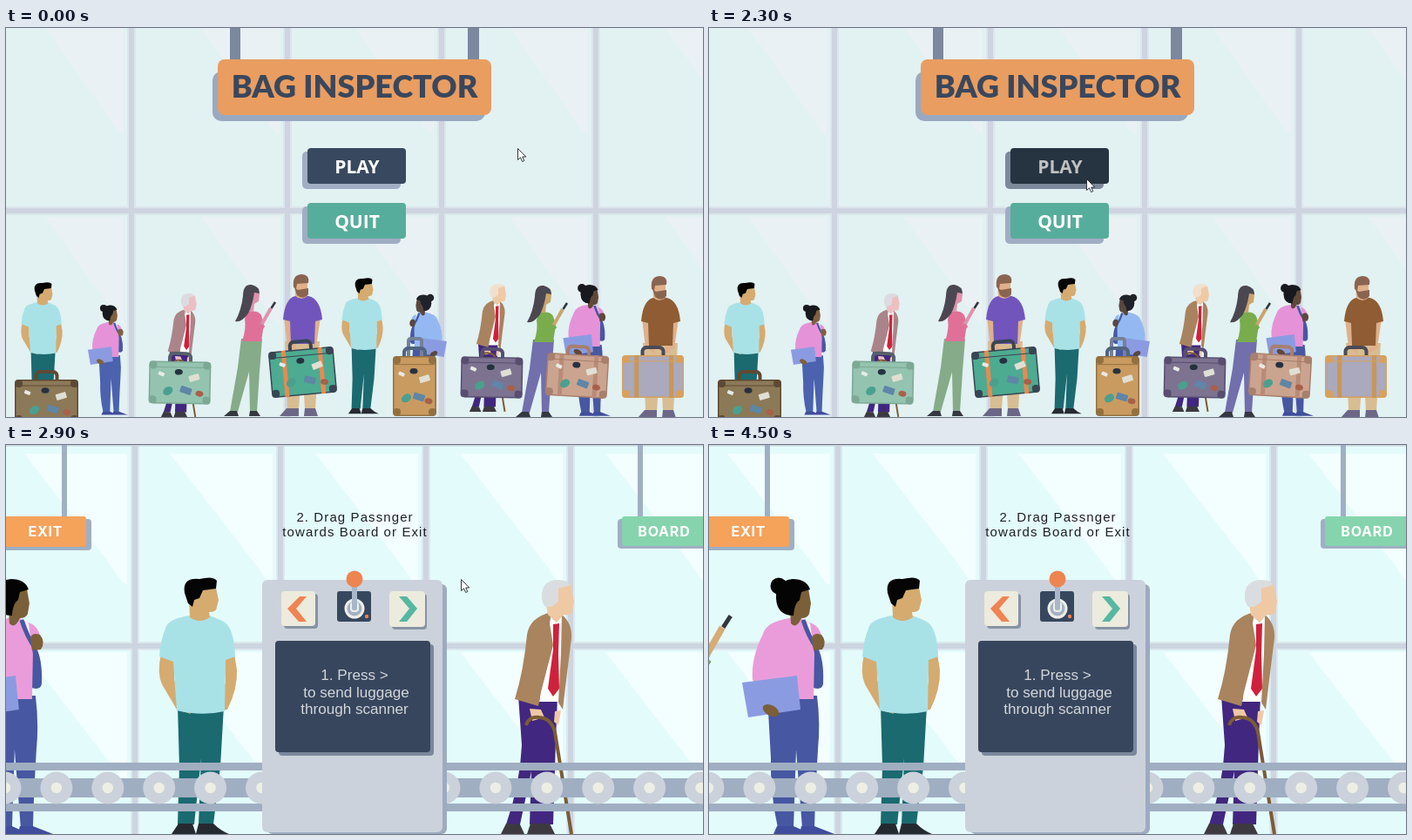
Recreate the animation shown at these times as an HTML page with a canvas. Size 800 by 447 pixels, loop 5000 ms.

```html
<!DOCTYPE html>
<html lang="en">
<head>
<meta charset="utf-8">
<title>Bag Inspector</title>
<style>
html, body { margin: 0; width: 100%; height: 100%; overflow: hidden; }
canvas { display: block; width: 800px; height: 447px; }
</style>
</head>
<body>
<canvas id="stage" width="800" height="447"></canvas>
<script>
const ctx = document.getElementById('stage').getContext('2d');
const LOOP = 5000, STEP = 100;

function fill(color, d) {
  ctx.fillStyle = color;
  ctx.fill(new Path2D(d));
}
function line(color, width, d) {
  ctx.strokeStyle = color;
  ctx.lineWidth = width;
  ctx.stroke(new Path2D(d));
}
function box(color, x, y, w, h, r = 0) {
  ctx.fillStyle = color;
  ctx.beginPath();
  ctx.roundRect(x, y, w, h, r);
  ctx.fill();
}
function oval(color, x, y, rx, ry = rx, angle = 0) {
  ctx.fillStyle = color;
  ctx.beginPath();
  ctx.ellipse(x, y, rx, ry, angle, 0, 7);
  ctx.fill();
}
function text(str, x, y, font, color, spacing = 0) {
  ctx.font = font;
  ctx.letterSpacing = spacing + 'px';
  ctx.fillStyle = color;
  ctx.textAlign = 'center';
  ctx.fillText(str, x + spacing / 2, y);
}
// Draws a figure so that its anchor (ax, ay) lands on (x, y).
function place(ax, ay, x, y, s, draw, flip) {
  ctx.save();
  ctx.translate(x, y);
  ctx.scale(flip ? -s : s, s);
  ctx.translate(-ax, -ay);
  draw();
  ctx.restore();
}

function youngMan(pants = '#1a6a70') {
  const skin = '#d5ab70';
  fill(pants, 'M197 300H250L246 370 238 436H221L224 360 216 436H197L199 370Z');
  fill('#252a31', 'M198 435H214L218 447H190Z M221 435H238Q246 443 256 447H218Z');
  fill(skin, 'M178 240Q173 262 179 275L196 304 212 309 205 292 193 270 193 240Z M250 240L252 272 244 306 254 304Q266 280 265 258L262 240Z');
  fill('#a8e2e7', 'M210 196Q188 200 184 208 177 225 176 243L192 249 196 305Q224 312 251 306L252 247 263 243Q262 208 248 202L234 196Q224 203 210 196Z');
  fill(skin, 'M210 175L211 198Q222 206 234 198L233 192Q242 192 242 186L244 178 241 164 216 162Z');
  fill('#050505', 'M205 170Q202 152 222 154 238 150 242 156L241 165 226 167 222 176 216 178 214 186 209 182Z');
}

function woman(top = '#ea9cda', skin = '#7a5f38', hair = '#040404', pants = '#4757a2') {
  fill(pants, 'M67 288H124Q128 320 125 350 122 400 121 440H107L100 350 97 440H79Q70 400 71 360Z');
  fill('#3f4d9c', 'M78 438H97L117 447H74Z M106 438H121L144 447H104Z');
  fill('#4757a2', 'M116 222Q133 235 131 275 129 283 117 278Z');
  fill(top, 'M92 199Q66 203 62 217 48 245 50 270L62 285 70 272V292H120L121 240 116 205Q108 200 104 198Z M112 203Q127 206 129 220L121 228Z');
  line('#4757a2', 5, 'M108 201Q114 220 124 234');
  fill(skin, 'M118 222Q120 215 129 218 136 226 130 235L120 236Z M92 172L94 205Q100 212 106 199 113 199 115 194L117 182 114 165 98 164Z');
  fill(hair, 'M77 176Q76 156 96 154 112 154 116 166L106 169 104 178Q98 182 97 196 78 196 77 176Z');
  oval(hair, 80, 162, 9.5);
  fill('#8b9be1', 'M38 273L101 265 105 304 45 313Z');
  oval(skin, 71, 305, 10, 6, 0.5);
}

function oldMan(jacket = '#a9845e', skin = '#efc8a4', hair = '#dadddf') {
  fill('#41277f', 'M588 288H633L631 340 628 436H601L603 375 590 436H574Q590 390 592 345Z');
  fill('#3c3a40', 'M574 435L590 436 595 447H568Z M602 435H624L630 447H598Z');
  fill('#ffffff', 'M624 202L640 197 642 230 636 295H612Z');
  fill('#d0213c', 'M628 206L635 205 634 240 635 280 628 289 622 280 628 235Z');
  fill(jacket, 'M626 192Q601 198 598 218 594 260 584 292L611 300 614 284 628 230 624 205Z M638 195Q650 205 649 222L643 270 639 304 634 296 637 240Z');
  fill(skin, 'M618 170L622 195 632 204 640 195Q650 197 650 190L652 180 648 160 630 158Z M601 303L614 304 618 313 604 317Z M630 306L637 305 634 322 629 318Z');
  fill(hair, 'M615 172Q616 155 634 155 646 155 647 161L634 165 634 180 626 186 619 186Q614 180 615 172Z');
  line('#7b5c36', 4, 'M597 322Q600 311 612 313 626 314 630 330L649 447');
}

function phoneGirl(top, skin, pants) {
  fill(pants, 'M270 357H294L291 395 288 441H280L279 395 266 441H257L266 390Z');
  fill('#343840', 'M257 440H265L267 446H250Z M280 440H288L292 446H279Z');
  fill(top, 'M276 327Q288 323 293 330L296 340 293 360H271Q276 345 274 335Z');
  line(skin, 4, 'M291 345L304 322');
  line(top, 6, 'M281 333L291 346 295 341');
  line('#33363d', 2.6, 'M304.5 322L309 315');
  fill(skin, 'M279 298Q291 297 291 306L290 314 285 317 284 326 276 326Z');
  fill('#4b4750', 'M272 308Q272 294 282 295 291 297 291 305L285 304Q283 318 278 328 270 339 263 337 270 325 272 308Z');
}

function beardedMan(shirt) {
  const skin = '#dfb08a', hair = '#8b6450';
  fill('#d8bd93', 'M320 360H360L355 438H343L340 385 336 438H323Z');
  fill('#6c6787', 'M322 437H336V446H314Z M343 437H355L358 446H342Z');
  fill(skin, 'M319 332L323 365 334 373 332 360 329 332Z M351 332L349 360 345 373 356 366 361 332Z');
  fill(shirt, 'M332 308Q320 311 318 335L326 337 327 363H354L355 337 363 335Q361 311 347 308Z');
  fill(skin, 'M331 290H346V308Q339 314 332 308Z');
  fill(hair, 'M330 298Q328 283 340 283 349 284 347 293L334 294 333 300Z M331 298L335 301 347 299V306Q341 313 334 307Z');
}

// Sticker: u, v, width, colour, angle, round
const STICKERS = [
  [0.2, 0.3, 7, '#e8ebe6', 0.4], [0.48, 0.25, 9, '#273140', 0, 1], [0.73, 0.38, 12, '#e0dfd4', -0.3],
  [0.31, 0.7, 12, '#4aa08f', -0.6, 1], [0.6, 0.68, 13, '#5e86a6', 0.3], [0.82, 0.75, 9, '#a8604a', 0.2, 1]
];
function suitcase(x, y, w, h, color, trim, { angle = 0, strap, plain, handle = trim } = {}) {
  ctx.save();
  ctx.translate(x + w / 2, y + h / 2);
  ctx.rotate(angle);
  ctx.translate(-w / 2, -h / 2);
  line(handle, 4, `M${w / 2 - 12} 1V-5Q${w / 2 - 11} -9 ${w / 2 - 7} -9H${w / 2 + 7}Q${w / 2 + 11} -9 ${w / 2 + 12} -5V1`);
  box(trim, 0, 0, w, h, 6);
  box(color, 1.5, 1.5, w - 3, h - 3, 5);
  for (const cx of [0, w - 9]) for (const cy of [0, h - 9]) box(trim, cx, cy, 9, 9, 4);
  if (strap) for (const u of [0.2, 0.76]) box(strap, w * u, 0, 5, h);
  line(trim, 1, `M2 ${h * 0.14}H${w - 2}`);
  if (!plain) for (const [u, v, size, tint, turn, round] of STICKERS) {
    ctx.save();
    ctx.translate(w * u, h * v);
    ctx.rotate(turn);
    if (round) oval(tint, 0, 0, size / 2, size / 2.7);
    else box(tint, -size / 2, -size / 3.4, size, size / 1.7, 1);
    ctx.restore();
  }
  ctx.restore();
}

function glass(base, shine, frame, edge, bars, mid, slope) {
  box(base, 0, 0, 800, 447);
  const width = bars[1] - bars[0];
  for (const right of [...bars, bars[3] + width]) {
    for (const top of [0, mid]) {
      const r = right - 9, y = top ? top + 7 : slope.top;
      fill(shine, `M${r - slope.w} ${y}H${r}V${y + slope.h}Q${r - 6} ${y + slope.h} ${r - 16} ${y + slope.h - 18}Z`);
    }
  }
  for (const [color, half] of [[edge, 5], [frame, 3]]) {
    for (const b of bars) box(color, b - half, 0, half * 2, 447);
    box(color, 0, mid - half, 800, half * 2);
  }
}

function button(label, y, face, shade, ink) {
  box(shade, 340, y + 4, 113, 43, 5);
  box(face, 346, y, 113, 41, 4);
  text(label, 403, y + 29, '700 21px "Open Sans", sans-serif', ink);
}

function crowd() {
  place(177, 152, 18, 292, 0.53, youngMan);
  place(80, 162, 112, 322, 0.43, () => woman('#e692d8', '#80603f', '#18191e', '#4b62ae'));
  place(634, 155, 210, 305, 0.486, () => oldMan('#aa8488', '#edbfc3', '#dbdcdf'));
  phoneGirl('#e07098', '#df93ac', '#85ab88');
  beardedMan('#7155bd');
  place(177, 152, 386, 287, 0.53, youngMan);
  place(80, 162, 487, 310, 0.45, () => woman('#94b9f2', '#59483f', '#20222a'), true);
  place(634, 155, 565, 294, 0.503, () => oldMan('#a9835f', '#f0c9a6', '#f0e0cd'));
  place(307, 318, 642, 319, 1, () => phoneGirl('#79ac4d', '#c9a56c', '#716fac'));
  place(80, 162, 661, 299, 0.515, () => woman('#e692d8', '#604838', '#18191e'));
  place(339, 283, 750, 285, 1, () => beardedMan('#8f5c33'));

  suitcase(10, 404, 73, 50, '#8c7957', '#5e4a34');
  suitcase(164, 383, 71, 49, '#94c3b0', '#7da894', { handle: '#56606a', angle: 0.02 });
  suitcase(303, 369, 75, 53, '#4cab90', '#394553', { angle: -0.09, strap: '#e98950' });
  line('#74819a', 4, 'M462 380V360Q462 357 465 357H474Q477 357 477 360V380');
  suitcase(444, 377, 50, 69, '#c99b60', '#94703f', { handle: '#52657f' });
  suitcase(522, 378, 71, 47, '#7d7391', '#574e70', { angle: 0.02 });
  suitcase(620, 375, 71, 49, '#cba48f', '#a87f6d', { angle: 0.06, strap: '#b98b77' });
  suitcase(707, 376, 71, 49, '#aaa9bd', '#d8a15c', { plain: true, strap: '#c99758', handle: '#4b4a55' });
}

function menu(t) {
  glass('#e2f1f2', '#eaf1f5', '#ced4e0', '#dce5ec', [144, 323, 500, 677], 210, { top: 0, w: 90, h: 122 });
  crowd();
  box('#7b889d', 257, 0, 12, 50);
  box('#7b889d', 530, 0, 13, 50);
  box('#9aa9c2', 237, 50, 313, 57, 10);
  box('#e99d60', 243, 36, 314, 64, 8);
  text('BAG INSPECTOR', 400, 80, '900 36px Lato, sans-serif', '#3a475d');
  if (t < 1700) button('PLAY', 138, '#38485f', '#a0adc3', '#ffffff');
  else button('PLAY', 138, '#263341', '#7c899b', '#bfc1c3');
  button('QUIT', 201, '#57ad9b', '#a0adc3', '#ffffff');
}

// Smooth walk: remaining distance to the resting place.
function walk(t, start, dist, time = 635) {
  const u = Math.min(1, Math.max(0, (t - start) / time));
  return -dist * (1 - u * u * (3 - 2 * u));
}

function belt() {
  const rail = '#a0aec1';
  for (const [y, h] of [[365, 9], [383, 22], [412, 9]]) box(rail, 0, y, 800, h);
  for (const x0 of [-1, 503]) for (let i = 0; i < 6; i++) {
    const x = x0 + i * 58.9;
    oval('#cbd2db', x, 394, 18.5);
    oval('#eeefe4', x, 394, 6.2);
  }
}

function machine() {
  box('#9dabc0', 300, 160, 206, 287, 6);
  box('#cbd2db', 294, 155, 207, 290, 6);
  const chevron = '#f08351', arrow = '#55b8a3';
  box('#8793a4', 319, 171, 39, 40, 4);
  box('#ecebdd', 316, 168, 39, 40, 4);
  box('#8793a4', 443, 171, 40, 41, 4);
  box('#ecebdd', 440, 168, 41, 41, 4);
  fill(chevron, 'M337 174H345L333 188 345 203H336L323 188Z');
  fill(arrow, 'M451 174H460L472 188 460 203H451L463 188Z');
  box('#37475e', 380, 168, 39, 35, 3);
  oval('#eeefe8', 400, 188, 11.5);
  oval('#a5b1c3', 400, 188, 8.5);
  box('#eeefe8', 395, 180, 10, 12, 4);
  box('#a9b7cb', 397, 160, 6, 30, 2);
  oval('#ee8450', 400, 154, 9.5);
  oval('#ee8450', 414, 197, 2.2);
  box('#7a879c', 313, 229, 178, 128, 4);
  box('#37465d', 309, 225, 178, 128, 4);
  const font = '17.1px "Liberation Sans", Arial, sans-serif', ink = '#d3d6db';
  text('1. Press >', 400, 270, font, ink);
  text('to send luggage', 402, 290, font, ink);
  text('through scanner', 400, 309, font, ink);
}

function signs() {
  const font = '700 16px Inter, sans-serif';
  box('#a1afc3', 64, 0, 6, 90);
  box('#9fafc3', -10, 85, 108, 36, 4);
  box('#f5a25b', -10, 82, 102, 35, 3);
  text('EXIT', 45, 105, font, '#ffffff', 0.8);
  box('#a1afc3', 725, 0, 6, 90);
  box('#9fafc3', 702, 85, 110, 34, 4);
  box('#86d4ad', 707, 82, 110, 34, 3);
  text('BOARD', 755, 105, font, '#ffffff', 0.8);
}

function checkpoint(t) {
  glass('#e4fbfb', '#f2feff', '#ccd5e0', '#dce8ee', [148, 315, 482, 648], 231, { top: 10, w: 118, h: 150 });
  box('#ccd5e0', 0, 0, 800, 1.5);
  signs();
  const move = (dx, draw) => place(0, 0, dx, 0, 1, draw);
  place(307, 318, 21 + walk(t, 3600, 112), 202, 1.89, () => phoneGirl('#79ac4d', '#d6ab74', '#716fac'));
  move(walk(t, 2720, 112), woman);
  move(walk(t, 2230, 112), youngMan);
  move(walk(t, 2212, 412), oldMan);
  belt();
  machine();
  const font = '15px "Liberation Sans", Arial, sans-serif';
  text('2. Drag Passnger', 400, 88, font, '#1c2024', 1.1);
  text('towards Board or Exit', 400, 105, font, '#1c2024', 1.1);
}

// Pointer: time, x, y
const TRAIL = [
  [0, 587, 138], [600, 437, 154], [700, 421, 158], [900, 421, 158], [1200, 433, 173],
  [2300, 433, 173], [2400, 440, 170], [2800, 520, 156], [2900, 522, 154], [3300, 522.5, 150],
  [4200, 522.5, 150], [4300, 503, 108], [4400, 450, 33]
];
function pointer(t) {
  const i = TRAIL.findIndex(k => k[0] > t);
  if (i < 0 && t > 4400) return;
  const b = i < 0 ? TRAIL[TRAIL.length - 1] : TRAIL[i];
  const a = i < 0 ? b : TRAIL[i - 1];
  const u = a === b ? 0 : (t - a[0]) / (b[0] - a[0]);
  place(0, 0, a[1] + (b[1] - a[1]) * u, a[2] + (b[2] - a[2]) * u, 1, () => {
    const d = 'M.5 .5V13.5L3.5 10.8 5.7 15.5 7.8 14.5 5.7 10H9.8Z';
    fill('#ffffff', d);
    line('#20242a', 0.9, d);
  });
}

function frame(now) {
  const t = Math.floor((now % LOOP) / STEP) * STEP;
  (t < 2400 ? menu : checkpoint)(t);
  pointer(t);
  requestAnimationFrame(frame);
}
let begin;
requestAnimationFrame(function first(now) {
  begin = now;
  const tick = time => {
    const t = Math.floor(((time - begin) % LOOP) / STEP) * STEP;
    (t < 2400 ? menu : checkpoint)(t);
    pointer(t);
    requestAnimationFrame(tick);
  };
  tick(now);
});
</script>
</body>
</html>
```
